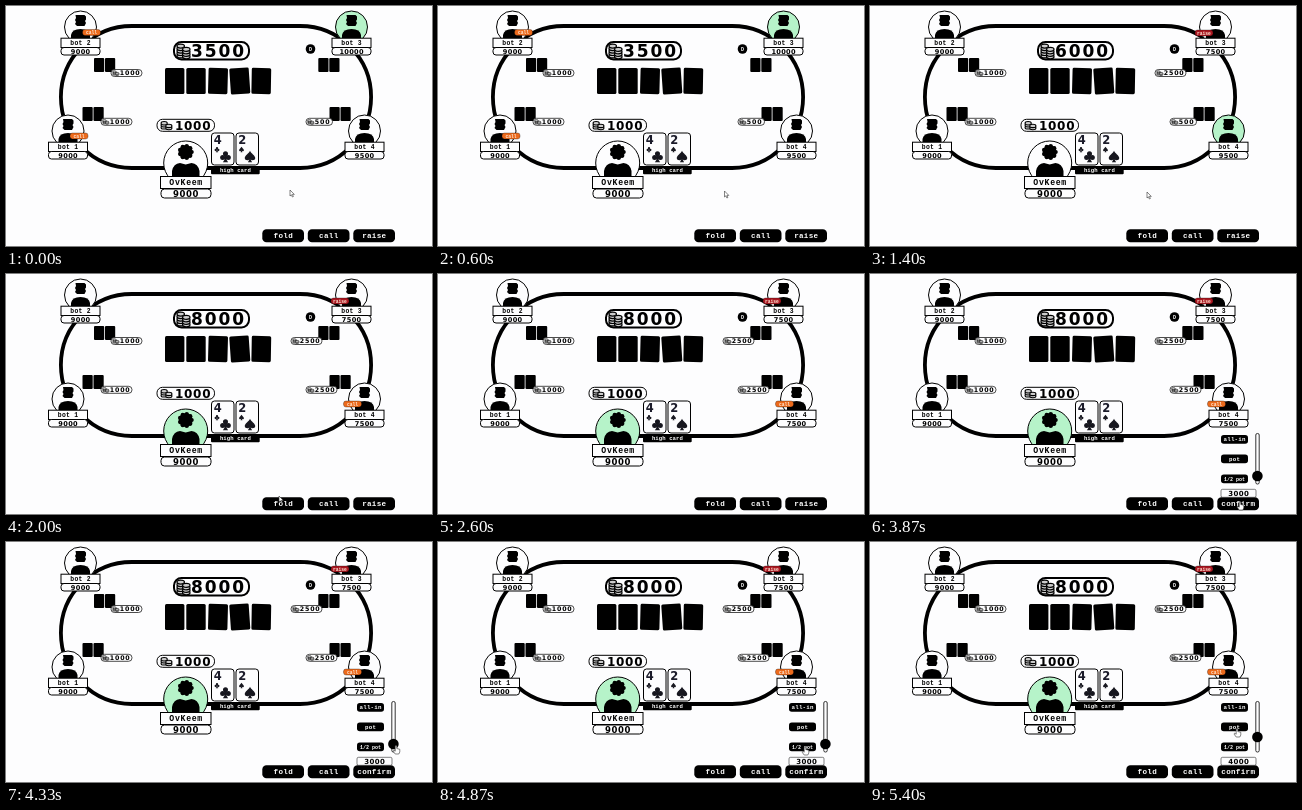
Animation, 426 px wide and 240 px high, one loop 5.47 s. Source, as an HTML page:

```html
<!DOCTYPE html>
<html lang="en">
<head>
<meta charset="utf-8">
<title>Poker table</title>
<style>
  html, body { margin: 0; width: 100%; height: 100%; overflow: hidden; background: #fdfdfe; }
  svg { display: block; width: 100vw; height: 100vh; }
  text { font-family: "Liberation Mono", monospace; font-weight: 700; }
  .num { font-family: "DejaVu Sans", sans-serif; }
</style>
</head>
<body>
<svg id="stage" viewBox="0 0 426 240"></svg>
<script>
const LOOP = 5470, STEP = 1000 / 15;
const INK = '#000', PAPER = '#fdfdfe', GREEN = '#b6f3c9', ORANGE = '#ec6a1c', RED = '#a91620';
const stage = document.getElementById('stage');

function el(tag, attrs, parent = stage) {
  const node = document.createElementNS('http://www.w3.org/2000/svg', tag);
  for (const key in attrs) node.setAttribute(key, attrs[key]);
  return parent.appendChild(node);
}
const group = (parent = stage) => el('g', {}, parent);
const show = (node, on) => node.setAttribute('visibility', on ? 'visible' : 'hidden');

function box(x, y, width, height, rx = 0, fill = PAPER, line = 0, parent = stage) {
  return el('rect', { x, y, width, height, rx, fill, stroke: line ? INK : 'none', 'stroke-width': line }, parent);
}
function disc(cx, cy, r, fill = INK, line = 0, parent = stage) {
  return el('circle', { cx, cy, r, fill, stroke: line ? INK : 'none', 'stroke-width': line }, parent);
}
// y is the vertical centre of the capitals
function label(str, x, y, size, o = {}) {
  const gap = o.gap || 0, anchor = o.anchor || 'middle';
  const node = el('text', {
    x: x + (anchor === 'middle' ? gap / 2 : 0), y: y + size * (o.num ? 0.365 : 0.33),
    'font-size': size, 'letter-spacing': gap, 'text-anchor': anchor,
    fill: o.fill || INK, class: o.num ? 'num' : ''
  }, o.parent || stage);
  node.textContent = str;
  return node;
}

// A pile of coins with a lower pile in front
function coins(x, y, s, high, parent) {
  const g = el('g', { transform: `translate(${x} ${y}) scale(${s})`, fill: '#ccc', stroke: INK, 'stroke-width': 0.8 }, parent);
  const pile = (cx, base, count) => {
    for (let i = 0; i < count; i++) el('ellipse', { cx, cy: base - i * 1.6, rx: 2.4, ry: 1.3 }, g);
  };
  pile(-1.8, high * 0.8 - 0.8, high);
  pile(1.8, high * 0.8 - 0.3, high - 1);
}

function bet(x, y, amount, width = 31) {
  const g = group();
  box(x, y, width, 7, 3.4, PAPER, 0.7, g);
  coins(x + 4.8, y + 3.5, 0.75, 3, g);
  label(amount, x + 8.8, y + 3.5, 6.3, { num: 1, gap: 0.8, anchor: 'start', parent: g });
  return g;
}

function seat(x, y, name, stack) {
  const face = disc(x, y, 16, PAPER, 1);
  el('path', { d: `M${x - 5} ${y - 12}h9l1.500 1.500v3l-1 1.500 1 2-1.500 3h-7.500l-2-2 1-2-1-2 1-2z`, fill: INK });
  el('path', { d: `M${x - 9.5} ${y + 12}v-4q1-6 9.500-6t9.500 6v4z`, fill: INK });
  box(x - 19.5, y + 11.2, 39, 9.3, 0, PAPER, 1);
  box(x - 19.5, y + 20.5, 39, 7.5, 3, PAPER, 1);
  label(name, x, y + 15.7, 6.4, { gap: 0.3 });
  return { face, stack: label(stack, x, y + 24.3, 6.6, { num: 1, gap: 0.3 }) };
}

function backs(x, y) {
  box(x, y, 10.2, 14, 1, INK);
  box(x + 11, y, 10.2, 14, 1, INK);
}

function badge(x, y, word, fill) {
  const g = group();
  box(x - 9, y - 3, 18, 6, 2.4, fill, 0.3, g);
  label(word, x, y, 4.6, { fill: '#ffe9d8', parent: g });
  return g;
}

function suit(kind, x, y, s) {
  const g = el('g', { transform: `translate(${x} ${y}) scale(${s})`, fill: '#17171f' });
  if (kind === 'club') {
    for (const [cx, cy] of [[0, -2.6], [-2.7, 1], [2.7, 1]]) el('circle', { cx, cy, r: 2.4 }, g);
    el('path', { d: 'M-.8-2H.8L1 3l1.500 2.500h-5L-1 3z' }, g);
  } else {
    el('path', { d: 'M0-5.500C1-3 5-1 5 1.500S1.500 4 .6 2.800L2 5.500h-4L-.6 2.800C-1.500 4-5 4-5 1.500S-1-3 0-5.500z' }, g);
  }
}

function faceCard(x, rank, kind) {
  box(x, 127, 22.5, 32, 3, PAPER, 1);
  label(rank, x + 6.2, 134.3, 11.5, { num: 1, fill: '#1b1b2a' });
  suit(kind, x + 5.5, 143.5, 0.48);
  suit(kind, x + 14, 150.5, 1.05);
}

function button(x, y, w, h, word, size, gap, parent) {
  box(x, y, w, h, h * 0.32, INK, 0, parent);
  return label(word, x + w / 2, y + h / 2, size, { fill: '#fff', gap, parent });
}

// Table, pot and board
box(54.9, 20, 310.2, 142, 71, PAPER, 3.8);
box(168, 36, 75, 17.5, 7.5, PAPER, 2);
coins(177.5, 45, 1.55, 5);
const pot = label('3500', 185, 44.5, 17, { num: 1, gap: 1.9, anchor: 'start' });
[[168.7, 0], [190, 0], [212, 1.5], [233.8, -4], [255.3, 1]].forEach(([x, tilt]) =>
  box(x - 9.7, 62, 19.4, 26, 1.5, INK).setAttribute('transform', `rotate(${tilt} ${x} 75)`));
disc(304.5, 43, 4.8);
label('D', 304.5, 43, 5, { fill: '#fff' });

// Bots
backs(88, 52);
backs(312.3, 52);
backs(76.5, 101);
backs(323.5, 101);
const bot1 = seat(62, 125, 'bot 1', '9000');
const bot2 = seat(74.5, 21, 'bot 2', '9000');
const bot3 = seat(345.5, 21, 'bot 3', '10000');
const bot4 = seat(358.5, 125, 'bot 4', '9500');
bet(105, 63.5, '1000');
bet(95, 112.3, '1000');
const bet3 = bet(285, 63.5, '2500');
const bet4Low = bet(300, 112.3, '500', 26.5);
const bet4High = bet(300, 112.3, '2500');
const earlyCalls = [badge(85.5, 26.5, 'call', ORANGE), badge(73, 130, 'call', ORANGE)];
const raised = badge(334, 27, 'raise', RED);
const lateCall = badge(346.5, 130, 'call', ORANGE);

// Player
box(151, 113.3, 57.5, 12, 5.5, PAPER, 1);
coins(160.5, 119.3, 1.3, 3);
label('1000', 169, 119.3, 12, { num: 1, gap: 0.7, anchor: 'start' });
const me = disc(179.7, 157, 22, PAPER, 1);
disc(179.7, 146, 7);
for (let i = 0; i < 9; i++) {
  const a = i * Math.PI * 2 / 9;
  disc(179.7 + 6 * Math.cos(a), 146 + 6 * Math.sin(a), 2.1);
}
el('path', { d: 'M166 171v-6q1.500-7.500 8-8l5.700 1.500 5.800-1.500q6.500.5 8 8v6z', fill: INK });
box(154.5, 170.5, 50.5, 12, 0, PAPER, 1);
box(155, 183, 50, 9, 3.5, PAPER, 1);
label('OvKeem', 179.8, 176.3, 8.2, { gap: 0.7 });
label('9000', 179.8, 187.6, 8.5, { num: 1, gap: 0.6 });
faceCard(205.5, '4', 'club');
faceCard(230, '2', 'spade');
box(205, 160, 48.7, 8.3, 1, INK);
label('high card', 229.4, 164, 5.6, { fill: '#fff', gap: 0.1 });

// Controls
button(256.3, 223.3, 41.7, 13, 'fold', 7.6, 0.3);
button(301.8, 223.3, 41.7, 13, 'call', 7.6, 0.3);
const action = button(347.3, 223.3, 41.7, 13, 'raise', 7.6, 0.3);
const panel = group();
button(351, 161, 27, 8.7, 'all-in', 5.8, 0.2, panel);
button(351, 180.6, 27, 8.7, 'pot', 5.8, 0.2, panel);
button(351, 200.6, 27, 8.7, '1/2 pot', 5, 0, panel);
box(385.8, 159.5, 3.4, 50.5, 1.5, PAPER, 0.8, panel);
const knob = disc(387.4, 202, 5.3, INK, 0, panel);
box(351, 215.3, 35, 8, 1.5, PAPER, 0.5, panel);
const amount = label('3000', 368.5, 219.3, 7, { num: 1, gap: 0.4, parent: panel });

// Pointer
const pointer = group();
const arrow = el('path', { d: 'M0 0v6l1.400-1.200 1 2.200 1-.5-1-2.100h1.900z', fill: '#fff', stroke: '#333', 'stroke-width': 0.6 }, pointer);
const hand = el('path', {
  d: 'M-.8 0q.8-1 1.600 0v2.500l3 .8v2.700l-1 2h-3.600l-2.200-3 .6-.8 1.600 1z',
  fill: '#fff', stroke: '#333', 'stroke-width': 0.6
}, pointer);

// Pointer path: time, x, y
const PATH = [
  [0, 284, 184], [600, 286.5, 185], [1000, 284, 186], [1400, 277, 186], [1800, 276, 200],
  [2200, 270, 244], [3420, 372, 244], [3700, 370, 228], [3950, 370, 228], [4270, 390, 204],
  [4450, 390, 204], [4750, 367, 205], [5050, 367, 205], [5330, 367, 187], [LOOP, 367, 187]
];
const ease = p => p * p * (3 - 2 * p);
function along(t) {
  const i = Math.max(1, PATH.findIndex(p => p[0] > t));
  const [t0, x0, y0] = PATH[i - 1], [t1, x1, y1] = PATH[i];
  const p = ease((t - t0) / (t1 - t0));
  return [x0 + (x1 - x0) * p, y0 + (y1 - y0) * p];
}

const RAISE = 1000, CALL = 2000, OPEN = 3800, HALF_POT = 4930;

function draw(t) {
  const hasRaise = t >= RAISE, hasCall = t >= CALL, open = t >= OPEN;
  pot.textContent = hasCall ? '8000' : hasRaise ? '6000' : '3500';
  bot3.stack.textContent = hasRaise ? '7500' : '10000';
  bot4.stack.textContent = hasCall ? '7500' : '9500';
  bot3.face.setAttribute('fill', hasRaise ? PAPER : GREEN);
  bot4.face.setAttribute('fill', hasRaise && !hasCall ? GREEN : PAPER);
  me.setAttribute('fill', hasCall ? GREEN : PAPER);
  earlyCalls.forEach(b => show(b, !hasRaise));
  show(raised, hasRaise);
  show(bet3, hasRaise);
  show(bet4Low, !hasCall);
  show(bet4High, hasCall);
  show(lateCall, hasCall);

  const value = t < HALF_POT ? 3000 : 4000;
  show(panel, open);
  action.textContent = open ? 'confirm' : 'raise';
  amount.textContent = value;
  knob.setAttribute('cy', 202 - (value - 3000) * 0.007);

  const [x, y] = along(t);
  pointer.setAttribute('transform', `translate(${x} ${y})`);
  const overControl = t > 3600;
  show(arrow, !overControl);
  show(hand, overControl);
}

const start = performance.now();
function tick() {
  const t = (performance.now() - start) % LOOP;
  draw(Math.min(Math.floor((t + 5) / STEP), 81) * STEP);
  requestAnimationFrame(tick);
}
tick();
</script>
</body>
</html>
```
